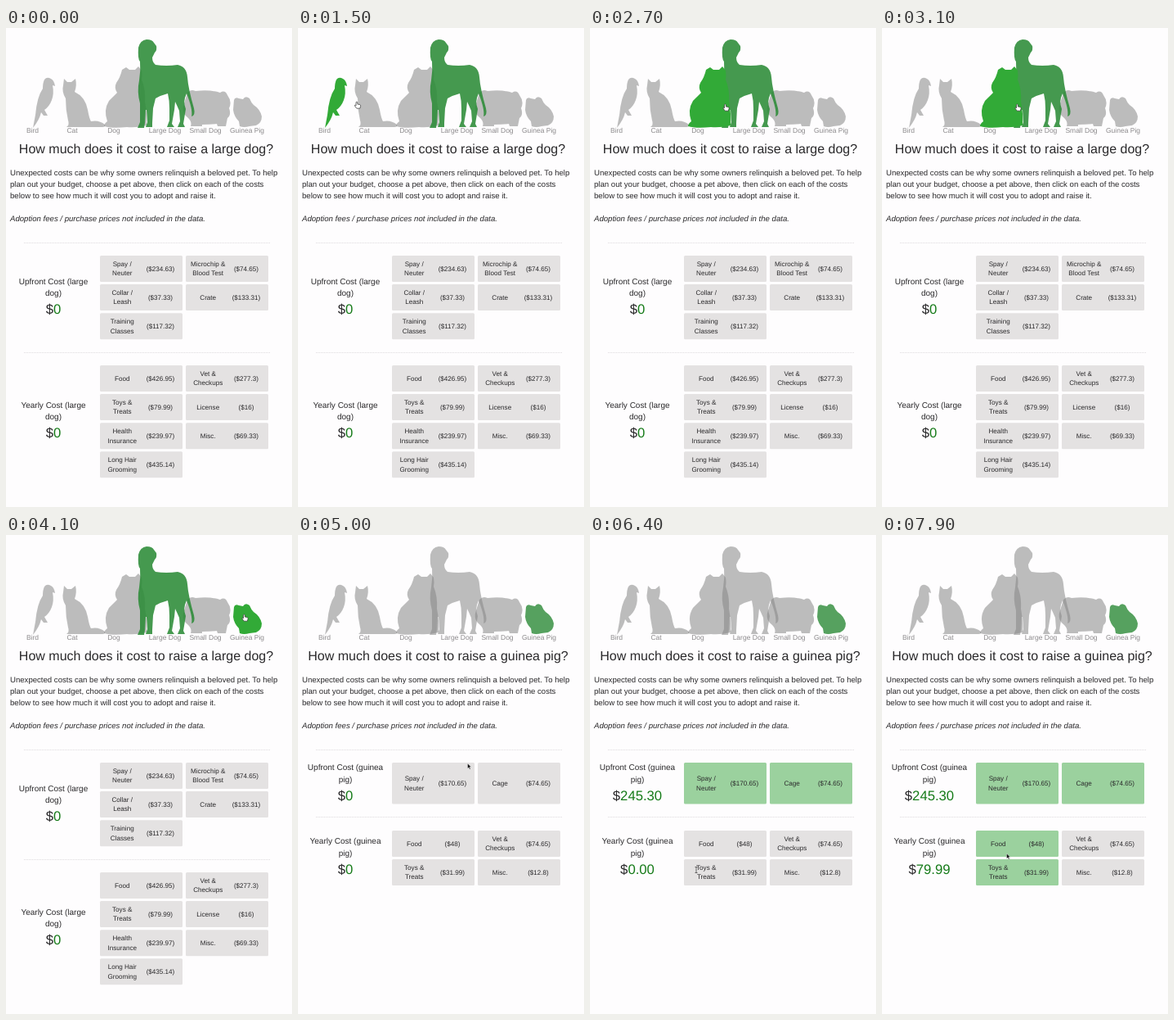
These frames come from a looping animation (350 by 585 pixels, 8 s). An HTML page:

```html
<!DOCTYPE html>
<html lang="en">
<head>
<meta charset="utf-8">
<title>Pet costs</title>
<style>
  html, body { margin: 0; width: 100%; height: 100%; overflow: hidden; background: #fefdfe; }
  svg { display: block; width: 350px; height: 585px; }
  text { font-family: "Liberation Sans", Arial, sans-serif; fill: #2a292b; text-rendering: geometricPrecision; }
</style>
</head>
<body>
<svg id="stage" viewBox="0 0 350 585"></svg>
<script>
const LOOP = 8000, PAGE_SWITCH = 4300;

const pets = [
  { name: 'Bird', x: 32.5, hover: [1150, 1550],
    d: 'M47 63Q50 59 55 62Q59 64 60 71L57 70Q59 80 56 88Q53 96 47 100L51 107H46L43 103Q41 112 33 122L36 106Q38 84 45 74Q45 67 47 63Z' },
  { name: 'Cat', x: 81, hover: [1550, 1900],
    d: 'M71 62L75 66H80L85 62Q87 70 84 78Q97 84 100 100Q102 111 104 114Q114 112 121 118Q122 121 118 121H74Q78 118 76 113Q73 100 73 86Q68 78 70 70Z' },
  { name: 'Dog', x: 132, hover: [1950, 3700],
    d: 'M142 51L147 48L151 51H158L162 47L166 52Q167 58 166 63Q171 75 170 90Q173 105 172 119Q160 122 148 121Q130 123 120 120Q120 117 124 114Q119 100 126 89Q131 84 136 79Q132 73 135 67Q140 60 142 51Z' },
  { name: 'Large Dog', x: 194.5, hover: [3700, 3830], chosen: [0, PAGE_SWITCH], lit: 0.88,
    d: 'M162 24Q164 15 172 14Q179 14 181 18L184 22Q185 27 182 30L179 36Q179 42 183 45Q196 47 210 45Q221 47 222 60Q223 74 230 98Q232 107 227 108Q229 100 221 80Q216 90 220 99L217 117L219 121H210L213 114L212 101Q209 94 207 90L206 100L203 117L206 121H197L200 113V98Q200 88 198 80Q190 82 183 86L180 98L179 116V121H171L173 115L172 100H171L170 116L169 122H161L164 115V92Q160 78 163 64Q165 52 164 41Q161 38 162 24Z' },
  { name: 'Small Dog', x: 244, hover: [3830, 3940],
    d: 'M222 79Q226 74 232 77Q250 75 262 79Q268 75 271 82Q277 90 273 98Q276 106 271 110L269 120H259L258 117Q250 118 240 118V120H226Q228 114 222 109Q214 103 218 92Z' },
  { name: 'Guinea Pig', x: 295, hover: [3940, 4600], chosen: [PAGE_SWITCH, LOOP], lit: 0.8,
    d: 'M279 88Q280 84 285 86L290 87Q293 82 298 86Q300 91 303 94Q311 99 313 108Q313 116 306 119L298 120Q291 122 286 120L285 114Q279 108 278 100Z' },
];

// Items: label (| breaks the line), price, time of click
const pages = [
  { pet: 'large dog', sections: [
    { title: 'Upfront', titleY: 310, top: 278, pitch: 35.1, h: 32, items: [
      ['Spay /|Neuter', 234.63], ['Microchip &|Blood Test', 74.65], ['Collar /|Leash', 37.33],
      ['Crate', 133.31], ['Training|Classes', 117.32]] },
    { title: 'Yearly', titleY: 461, rule: 396.5, top: 412, pitch: 35.1, h: 32, items: [
      ['Food', 426.95], ['Vet &|Checkups', 277.3], ['Toys &|Treats', 79.99], ['License', 16],
      ['Health|Insurance', 239.97], ['Misc.', 69.33], ['Long Hair|Grooming', 435.14]] }] },
  { pet: 'guinea pig', sections: [
    { title: 'Upfront', titleY: 284.5, top: 278, pitch: 54, h: 50.5, items: [
      ['Spay /|Neuter', 170.65, 5300], ['Cage', 74.65, 5850]] },
    { title: 'Yearly', titleY: 374.5, rule: 344.5, top: 361, pitch: 35, h: 32, items: [
      ['Food', 48, 7350], ['Vet &|Checkups', 74.65], ['Toys &|Treats', 31.99, 6600], ['Misc.', 12.8]] }] },
];

// Pointer path: time, x, y
const route = [
  [700, 118, 2], [1150, 47, 80], [1300, 49, 87], [1500, 71, 90], [1800, 100, 94], [2200, 158, 96],
  [2500, 164.5, 93], [3300, 164.5, 93], [3400, 167, 93], [3650, 167, 93], [4050, 290.5, 97],
  [4400, 290.5, 97], [4600, 280, 122], [5000, 207.5, 279], [5200, 190, 300], [5500, 190, 302],
  [5800, 262, 304], [5950, 262, 304], [6400, 130, 409], [6600, 136, 412], [6950, 138, 412],
  [7300, 150, 380], [7500, 151, 380], [7800, 152.5, 389], [LOOP, 152.5, 389],
];

const stage = document.getElementById('stage');

function add(parent, tag, attrs, content = '') {
  const el = document.createElementNS('http://www.w3.org/2000/svg', tag);
  for (const key in attrs) el.setAttribute(key, attrs[key]);
  el.textContent = content;
  parent.append(el);
  return el;
}

function write(parent, str, x, centerY, size, attrs = {}) {
  return add(parent, 'text', { x, y: centerY + size * 0.29, 'font-size': size, 'text-anchor': 'middle', ...attrs }, str);
}

function rule(parent, y) {
  add(parent, 'path', { d: `M22 ${y}H323`, stroke: '#d6d4d6', 'stroke-width': 0.8, 'stroke-dasharray': '1 1' });
}

function buildSection(parent, section, pet) {
  const { title, titleY, top, pitch, h, items } = section;
  const [first, second] = pet.split(' ');
  if (section.rule) rule(parent, section.rule);
  write(parent, `${title} Cost (${first}`, 58, titleY, 10);
  write(parent, `${second})`, 58, titleY + 14.2, 10);
  const total = write(parent, '$', 58, titleY + 34.3, 16.7);
  section.amount = add(total, 'tspan', { fill: '#147a17' }, '0');
  section.boxes = items.map(([label, price], i) => {
    const x = 115 + (i % 2) * 105, y = top + (i >> 1) * pitch, mid = y + h / 2 + 0.4;
    const box = add(parent, 'rect', { x, y, width: 101, height: h, rx: 1.5 });
    const lines = label.split('|');
    lines.forEach((line, k) => write(parent, line, x + 27.2, mid + (k - (lines.length - 1) / 2) * 11.2, 8.1));
    write(parent, `($${price})`, x + 74, mid, 8.1);
    return box;
  });
}

const zoo = add(stage, 'g', {});
for (const pet of pets) {
  pet.shape = add(zoo, 'path', { d: pet.d });
  write(stage, pet.name, pet.x, 126, 8.5, { style: 'fill:#8b898b' });
}
['Unexpected costs can be why some owners relinquish a beloved pet. To help',
 'plan out your budget, choose a pet above, then click on each of the costs',
 'below to see how much it will cost you to adopt and raise it.'].forEach((line, i) =>
  write(stage, line, 5, 177.2 + i * 14.2, 9.6, { 'text-anchor': 'start' }));
write(stage, 'Adoption fees / purchase prices not included in the data.', 5, 233.7, 9.6,
  { 'text-anchor': 'start', 'font-style': 'italic' });
rule(stage, 262.5);

for (const page of pages) {
  page.group = add(stage, 'g', {});
  write(page.group, `How much does it cost to raise a ${page.pet}?`, 171.5, 148, 16);
  page.sections.forEach(section => buildSection(page.group, section, page.pet));
}

const pointer = add(stage, 'path', { 'stroke-linejoin': 'round' });
const pointers = {
  hand: { d: 'M0 .6Q1 -.4 1.8 .6V3L4.8 3.6Q5.8 4 5.6 5.5L4.8 8.2H.8L-1.6 5Q-1.8 3.8 -.6 4.2L0 4.8Z',
    fill: '#fff', stroke: '#333', 'stroke-width': 0.7 },
  arrow: { d: 'M0 0V6.2L1.5 4.9L2.6 7.3L3.6 6.8L2.5 4.5H4.5Z', fill: '#111', stroke: '#fff', 'stroke-width': 0.4 },
  beam: { d: 'M-1.5 -3.5H1.5M0 -3.5V3.5M-1.5 3.5H1.5', fill: 'none', stroke: '#333', 'stroke-width': 0.7 },
};

const clamp = v => Math.max(0, Math.min(1, v));
const mix = (a, b, k) => a + (b - a) * k;
const inside = (t, [from, to]) => t >= from && t < to;

function pointerAt(t) {
  const i = route.findIndex(stop => stop[0] > t);
  const [t0, x0, y0] = route[i - 1], [t1, x1, y1] = route[i];
  const k = (t - t0) / (t1 - t0), eased = k * k * (3 - 2 * k);
  return [mix(x0, x1, eased), mix(y0, y1, eased)];
}

// The chosen pet lies over the plain ones, the hovered pet over all
function drawPets(t) {
  const layers = [[], [], []];
  for (const { shape, hover, chosen, lit } of pets) {
    const state = inside(t, hover) ? 2 : chosen && inside(t, chosen) ? 1 : 0;
    shape.setAttribute('fill', ['#888', '#2c8b37', '#32aa37'][state]);
    shape.setAttribute('opacity', [0.55, lit, 1][state]);
    layers[state].push(shape);
  }
  zoo.append(...layers.flat());
}

function drawSection({ items, boxes, amount }, t) {
  let sum = 0;
  items.forEach(([, price, click = Infinity], i) => {
    const rest = 1 - clamp((t - click) / 450);
    sum += price * (1 - rest ** 3);
    boxes[i].setAttribute('fill', t >= click ? '#9bd19e' : '#e4e2e2');
  });
  amount.textContent = t < 5300 ? '0' : sum.toFixed(2);
}

function drawPointer(t) {
  const visible = t >= route[0][0];
  pointer.setAttribute('visibility', visible ? 'visible' : 'hidden');
  if (!visible) return;
  const [x, y] = pointerAt(t);
  const kind = inside(t, [6360, 6950]) ? 'beam' : inside(t, [1100, 4600]) ? 'hand' : 'arrow';
  for (const key in pointers[kind]) pointer.setAttribute(key, pointers[kind][key]);
  pointer.setAttribute('transform', `translate(${x} ${y})`);
}

function frame() {
  const t = performance.now() % LOOP;
  const current = pages[t < PAGE_SWITCH ? 0 : 1];
  for (const page of pages) page.group.setAttribute('display', page === current ? 'inline' : 'none');
  current.sections.forEach(section => drawSection(section, t));
  drawPets(t);
  drawPointer(t);
  requestAnimationFrame(frame);
}
frame();
</script>
</body>
</html>
```
